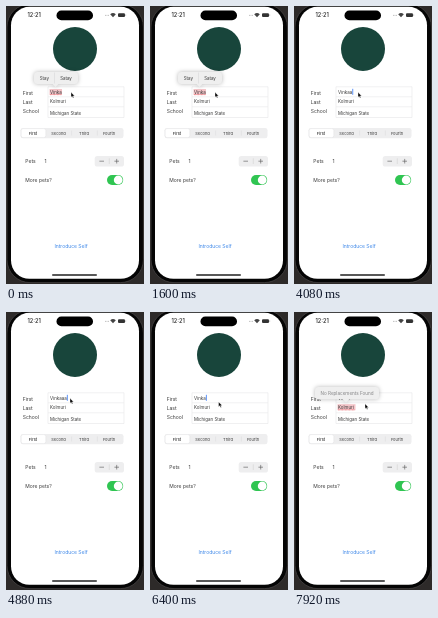
Write an HTML page that moves like this. It is 138 px wide and 278 px high and loops after 8000 ms.

```html
<!DOCTYPE html>
<html lang="en">
<head>
<meta charset="utf-8">
<style>
  html, body { margin: 0; width: 100%; height: 100%; overflow: hidden; background: #000; }
  svg { display: block; width: 100vw; height: 100vh; }
  text { font-family: Inter, "Liberation Sans", sans-serif; font-size: 5px; fill: #3a3a3a; }
  .small { font-size: 4.45px; }
  .tab { font-size: 4px; }
  .mid { text-anchor: middle; }
  .line { fill: none; stroke: #e6e6e8; stroke-width: .6; }
  .pick { fill: #f4c4c8; }
  .wrong { stroke: #e5484d; stroke-width: .6; stroke-dasharray: .8 .6; }
  .menu { fill: #efefef; }
  .popup { filter: drop-shadow(0 .8px 2.2px rgba(0, 0, 0, .28)); }
</style>
</head>
<body>
<svg viewBox="0 0 138 278" preserveAspectRatio="none">
  <!-- phone -->
  <rect width="138" height="278" fill="#2d2a29"/>
  <rect x="1" y="-2" width="136.4" height="278.6" rx="23" fill="#050505" stroke="#4a4747" stroke-width=".7"/>
  <rect x="5" y=".8" width="128" height="272" rx="18.5" fill="#fff"/>
  <rect x="50.5" y="4.5" width="36.5" height="9.8" rx="4.9"/>

  <!-- status bar -->
  <text x="21.5" y="11.2" font-weight="600" style="font-size:5.5px">12:21</text>
  <g fill="#aaa">
    <circle cx="99.5" cy="9.3" r=".5"/><circle cx="101" cy="9.3" r=".5"/>
    <circle cx="102.5" cy="9.3" r=".5"/>
  </g>
  <path d="M104.2 8.2Q107 5.8 109.8 8.2L107 11.2Z" fill="#444"/>
  <rect x="112" y="7.2" width="7" height="3.8" rx="1.1" fill="#333"/>
  <rect x="119.5" y="8.4" width=".6" height="1.4" fill="#999"/>

  <circle cx="69" cy="43" r="22" fill="#18453b"/>

  <!-- form -->
  <text x="16.7" y="88.6">First</text>
  <text x="16.7" y="97.5">Last</text>
  <text x="16.7" y="106.7">School</text>
  <path class="line" d="M42 80.8H118V111.5H42ZM42 90.8H118M42 100.8H118"/>
  <g id="firstPick">
    <rect class="pick" x="43.5" y="83" width="12.5" height="6"/>
    <path class="wrong" d="M44 88.7H55.5"/>
  </g>
  <g id="lastPick">
    <rect class="pick" x="43.5" y="92.2" width="18" height="6"/>
    <path class="wrong" d="M44 97.9H61"/>
  </g>
  <text class="small" id="first" x="44" y="87.6"></text>
  <text class="small" x="44" y="96.9">Kolmuri</text>
  <text class="small" x="44" y="108.5">Michigan State</text>
  <rect id="caret" y="82.8" width=".8" height="6" fill="#3478f6"/>

  <!-- tabs -->
  <rect x="14.5" y="121.9" width="103" height="10.4" rx="2.4" fill="#eeeeef"/>
  <rect x="15.2" y="122.6" width="24.6" height="9" rx="2" fill="#fff" stroke="#dedee0" stroke-width=".4"/>
  <path d="M65.6 124.5V129.5M91.4 124.5V129.5" stroke="#d4d4d6" stroke-width=".4"/>
  <text class="tab mid" x="27" y="128.6" font-weight="500">First</text>
  <text class="tab mid" x="52.5" y="128.6">Second</text>
  <text class="tab mid" x="78" y="128.6">Third</text>
  <text class="tab mid" x="103" y="128.6">Fourth</text>

  <!-- pets -->
  <text x="19.3" y="157.4">Pets</text>
  <text x="38.5" y="157.4">1</text>
  <rect x="88.7" y="149.9" width="29.3" height="10.6" rx="2.6" fill="#eeeeef"/>
  <path d="M93.4 155.2H98M108.4 155.2H113M110.7 152.9V157.5" stroke="#555" stroke-width=".6"/>
  <path d="M103.3 152.4V158" stroke="#ccc" stroke-width=".5"/>
  <text x="19.3" y="175.8">More pets?</text>
  <rect x="101" y="169" width="16.2" height="10" rx="5" fill="#30c552"/>
  <circle cx="112.2" cy="174" r="4.4" fill="#fff"/>

  <text class="mid" x="65" y="241.8" style="fill:#3b86e8">Introduce Self</text>
  <rect x="46" y="268.2" width="45" height="1.6" rx=".8" fill="#222"/>

  <!-- popups -->
  <g id="fixes" class="popup">
    <path class="menu" d="M46 77.5H53L49.5 81Z"/>
    <rect class="menu" x="28" y="66" width="44" height="12" rx="3.5"/>
    <path d="M48.5 66.5V77.5" stroke="#d2d2d4" stroke-width=".5"/>
    <text class="small mid" x="38.4" y="73.6">Stay</text>
    <text class="small mid" x="60" y="73.6">Satay</text>
  </g>
  <g id="none" class="popup">
    <path class="menu" d="M48.5 87H55.5L52 90.5Z"/>
    <rect class="menu" x="21" y="75" width="64" height="12.3" rx="3.5"/>
    <text class="mid" x="53" y="82.9" style="font-size:4.6px;fill:#858587">No Replacements Found</text>
  </g>

  <path id="mouse" d="M0 0V4.9L1.2 3.9L2 5.7L2.9 5.3L2.1 3.6H3.6Z" stroke="#fff" stroke-width=".4"/>
</svg>
<script>
const LOOP = 8000, NAME = "Vinka";
const $ = id => document.getElementById(id);
const clamp = x => Math.max(0, Math.min(1, x));
const ramp = (t, from, to) => clamp((t - from) / (to - from));
const ease = x => x * x * (3 - 2 * x);
const show = (id, a) => $(id).setAttribute("opacity", +a);

function typed(t) {
  if (t < 2320) return NAME;
  if (t < 2960) return "";
  if (t < 4400) return (NAME + "a").slice(0, 1 + Math.floor((t - 2960) / 180));
  if (t < 5840) return NAME + "aa";
  return t < 6080 ? NAME + "a" : NAME;
}

function draw(t) {
  const field = $("first");
  field.textContent = typed(t);
  $("caret").setAttribute("x", 44.2 + (field.textContent ? field.getComputedTextLength() : 0));
  show("caret", t >= 2160 && t < 6480);
  show("firstPick", t < 2160);
  show("fixes", 1 - ramp(t, 1960, 2160));
  show("lastPick", t >= 6640);
  show("none", ramp(t, 7360, 7560));

  const drift = ease(ramp(t, 2900, 3500)), move = ease(ramp(t, 6100, 6600));
  const x = 65 - drift + 7 * move, y = 86.3 + 5.5 * move;
  $("mouse").setAttribute("transform", `translate(${x} ${y})`);
}

const start = performance.now();
function tick(now) {
  draw(Math.max(0, now - start) % LOOP);
  requestAnimationFrame(tick);
}
draw(0);
requestAnimationFrame(tick);
</script>
</body>
</html>
```
